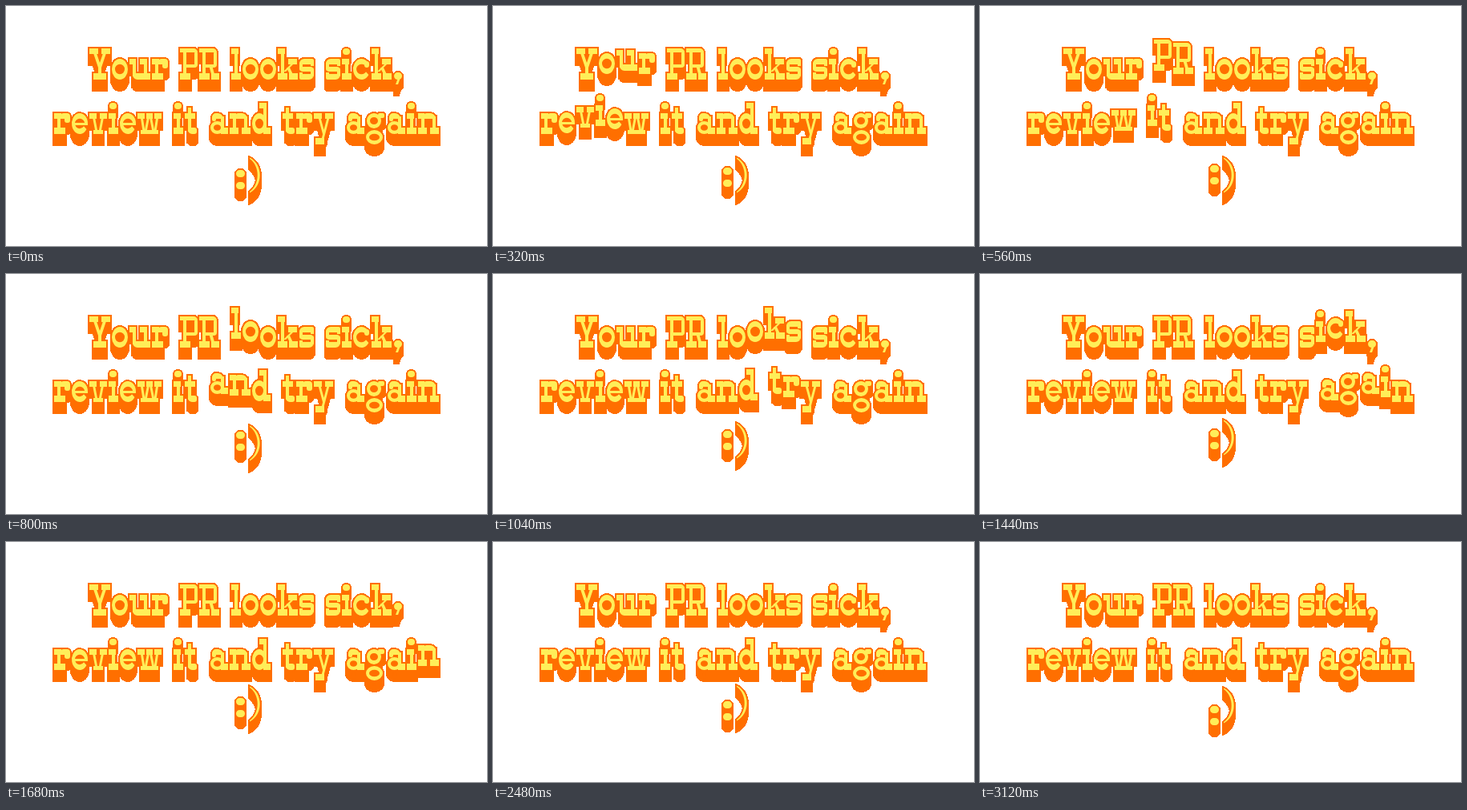
Animation, 600 px wide and 300 px high, one loop 3.2 s. Source, as an HTML page with a canvas:

```html
<!DOCTYPE html>
<html lang="en">
<head>
<meta charset="utf-8">
<title>Your PR looks sick</title>
<style>
html, body { margin: 0; width: 100%; height: 100%; overflow: hidden; background: #fff; }
canvas { display: block; width: 600px; height: 300px; }
</style>
</head>
<body>
<canvas id="stage" width="600" height="300" role="img"
  aria-label="Your PR looks sick, review it and try again :)"></canvas>
<script>
const YELLOW = '#ffee58', ORANGE = '#ff6f00';
const LOOP = 3200, STEP = 80, LIFT = 10.5, DEPTH = 13;
const CAP = 39, XH = 26, HEAD = 7, FOOT = 8, STEM = 4;

// Pen for slab letters; y runs upwards from the baseline.
class Pen {
  constructor() { this.path = new Path2D(); }
  box(x, y, w, h, r = 0) { this.path.roundRect(x, -y - h, w, h, r); }
  foot(x0, x1, h = FOOT) { this.box(x0, 0, x1 - x0, h); }
  head(x0, x1, top = XH) { this.box(x0, top - HEAD, x1 - x0, HEAD); }
  stem(x, y0, y1) { this.box(x, y0, STEM, y1 - y0); }
  slant(x0, y0, x1, y1, w = 3) {
    const p = this.path;
    p.moveTo(x0, -y0);
    p.lineTo(x0 + w, -y0);
    p.lineTo(x1 + w, -y1);
    p.lineTo(x1, -y1);
    p.closePath();
  }
  // Bowl with heavy top and bottom; from and to are turns.
  ring(x, y, w, h, from = 0, to = 1) {
    const p = this.path, cx = x + w / 2, cy = -y - h / 2;
    const a = from * 2 * Math.PI, b = to * 2 * Math.PI;
    const rx = w / 2, ry = h / 2, ix = rx - STEM, iy = ry - Math.min(7, h * 0.26);
    p.moveTo(cx + rx * Math.cos(a), cy + ry * Math.sin(a));
    p.ellipse(cx, cy, rx, ry, 0, a, b);
    p.lineTo(cx + ix * Math.cos(b), cy + iy * Math.sin(b));
    p.ellipse(cx, cy, ix, iy, 0, b, a, true);
    p.closePath();
  }
  upright(top) { this.head(0, 9, top); this.stem(4, 0, top); this.foot(0, 12); }
  bigP() {
    this.box(0, CAP - 5, 14, 5);
    this.stem(4, 0, CAP);
    this.foot(0, 13);
    this.box(8, CAP - 5, 14, 5, [0, 6, 0, 0]);
    this.box(8, 15, 14, 4, [0, 0, 6, 0]);
    this.box(18, 17, STEM, 18, 2);
  }
}

// Each letter: width and drawing.
const LETTERS = {
  Y: [26, p => {
    p.head(0, 11, CAP); p.head(15, 26, CAP);
    p.slant(3, CAP, 11, 15, 4); p.slant(19, CAP, 11, 15, 4);
    p.stem(11, 0, 17); p.foot(5, 21);
  }],
  P: [22, p => p.bigP()],
  R: [25, p => { p.bigP(); p.slant(12, 18, 17, 0, 4); p.foot(15, 25); }],
  a: [24, p => {
    p.box(4, 19, 14, HEAD, [5, 7, 0, 0]); p.box(4, 16, 5, 6, 2);
    p.stem(15, 0, 22); p.ring(2, 0, 17, 16); p.foot(15, 24);
  }],
  c: [21, p => { p.ring(0, 0, 21, XH, 0.09, 0.9); p.box(14, 15, 6, 8, 3); }],
  d: [23, p => {
    p.ring(0, 0, 18, XH); p.stem(14, 0, CAP); p.head(9, 18, CAP); p.foot(14, 23);
  }],
  e: [20, p => { p.ring(0, 0, 20, XH, 0.09, 1); p.box(3, 11, 17, 3); }],
  g: [23, p => {
    p.ring(1, 7, 18, 19); p.box(15, 20, 8, 6, 2); p.ring(0, -13, 21, 18);
  }],
  i: [12, p => { p.upright(XH); p.box(1, 31, 9, 8, 4); }],
  k: [25, p => {
    p.upright(CAP); p.head(13, 24);
    p.slant(18, 21, 7, 10); p.slant(11, 15, 18, 0, 4); p.foot(14, 25);
  }],
  l: [12, p => p.upright(CAP)],
  n: [26, p => {
    p.head(0, 8); p.stem(4, 0, XH); p.foot(0, 11);
    p.box(7, 19, 15, HEAD, [4, 7, 0, 0]); p.stem(18, 0, 22); p.foot(15, 26);
  }],
  o: [20, p => p.ring(0, 0, 20, XH)],
  r: [20, p => {
    p.head(0, 9); p.stem(4, 0, XH); p.foot(0, 14);
    p.box(8, 19, 12, HEAD, [4, 4, 0, 0]); p.box(13, 14, 7, 10, 3);
  }],
  s: [18, p => {
    p.box(0, 19, 18, HEAD, [6, 2, 0, 0]); p.box(0, 11, STEM, 12, 2);
    p.box(1, 10, 16, 6, 3); p.box(14, 3, STEM, 12, 2);
    p.box(0, 0, 18, HEAD, [0, 0, 6, 2]); p.box(14, 17, 4, 7); p.box(0, 2, 4, 7);
  }],
  t: [15, p => {
    p.stem(4, 3, 33); p.head(0, 13); p.box(4, 0, 11, FOOT, [0, 3, 3, 5]);
  }],
  u: [26, p => {
    p.head(0, 8); p.stem(4, 4, XH); p.head(13, 22);
    p.stem(18, 0, XH); p.box(4, 0, 22, FOOT, [0, 0, 0, 6]);
  }],
  v: [22, p => {
    p.head(0, 9); p.head(13, 22); p.slant(3, XH, 8, 0); p.slant(16, XH, 11, 0);
    p.foot(5, 17, 5);
  }],
  w: [30, p => {
    p.head(0, 9); p.head(11, 19); p.head(21, 30);
    p.slant(3, XH, 7, 0); p.slant(13, XH, 8, 0);
    p.slant(14, XH, 19, 0); p.slant(24, XH, 20, 0);
    p.foot(4, 26, 5);
  }],
  y: [24, p => {
    p.head(0, 10); p.head(14, 24); p.slant(4, XH, 11, 0);
    p.slant(18, XH, 8, -12); p.box(2, -13, 11, FOOT);
  }],
  ',': [12, p => { p.box(1, 0, 10, 9, 4.5); p.slant(7, 5, 3, -6); }],
  ':': [11, p => { p.box(0, 15, 11, 9, 4.5); p.box(0, 0, 11, 9, 4.5); }],
  ')': [13, ({ path }) => {
    path.moveTo(4, -39.5);
    path.bezierCurveTo(21, -31, 21, -4, 4, 4.5);
    path.lineTo(4, 3);
    path.bezierCurveTo(17, -6, 17, -29, 4, -38);
    path.closePath();
  }]
};

const GAP = 2, SPACE = 13;
const shapes = {};
for (const ch in LETTERS) {
  const pen = new Pen();
  LETTERS[ch][1](pen);
  shapes[ch] = pen.path;
}
const advance = ch => (ch === ' ' ? SPACE : LETTERS[ch][0] + GAP);

function layout(text, base) {
  const chars = [...text];
  const width = chars.reduce((sum, ch) => sum + advance(ch), -GAP);
  let x = Math.floor(300 - width / 2);
  return chars.map((ch, index) => {
    const glyph = { ch, x, base, index, count: chars.length };
    x += advance(ch);
    return glyph;
  });
}
const glyphs = [
  ...layout('Your PR looks sick,', 92),
  ...layout('review it and try again', 160),
  ...layout(':)', 229)
].filter(g => g.ch !== ' ');

// Every letter hops once; shorter lines hop more slowly.
function lift({ index, count }, tick) {
  const delay = 19 / count;
  const phase = (tick - index * delay) / (4 * delay);
  return phase > 0 && phase < 1 ? Math.round(LIFT * Math.sin(Math.PI * phase)) : 0;
}

const ctx = document.getElementById('stage').getContext('2d', { willReadFrequently: true });
ctx.lineWidth = 4;
ctx.miterLimit = 3;

function hardenEdges() {
  const image = ctx.getImageData(0, 0, 600, 300), px = image.data;
  for (let i = 3; i < px.length; i += 4) px[i] = px[i] > 127 ? 255 : 0;
  ctx.putImageData(image, 0, 0);
}

function draw(tick) {
  ctx.clearRect(0, 0, 600, 300);
  ctx.strokeStyle = ORANGE;
  ctx.fillStyle = ORANGE;
  for (const g of glyphs) {
    for (let z = 0; z <= DEPTH; z++) {
      ctx.setTransform(1, 0, 0, 1, g.x, g.base - lift(g, tick) + z);
      ctx.fill(shapes[g.ch]);
      ctx.stroke(shapes[g.ch]);
    }
  }
  ctx.fillStyle = YELLOW;
  for (const g of glyphs) {
    ctx.setTransform(1, 0, 0, 1, g.x, g.base - lift(g, tick));
    ctx.fill(shapes[g.ch]);
  }
  ctx.setTransform(1, 0, 0, 1, 0, 0);
  hardenEdges();
}

const start = performance.now();
let shown = -1;
function play(now) {
  const tick = Math.floor((Math.max(0, now - start) % LOOP) / STEP);
  if (tick !== shown) draw(shown = tick);
  requestAnimationFrame(play);
}
play(start);
</script>
</body>
</html>
```
